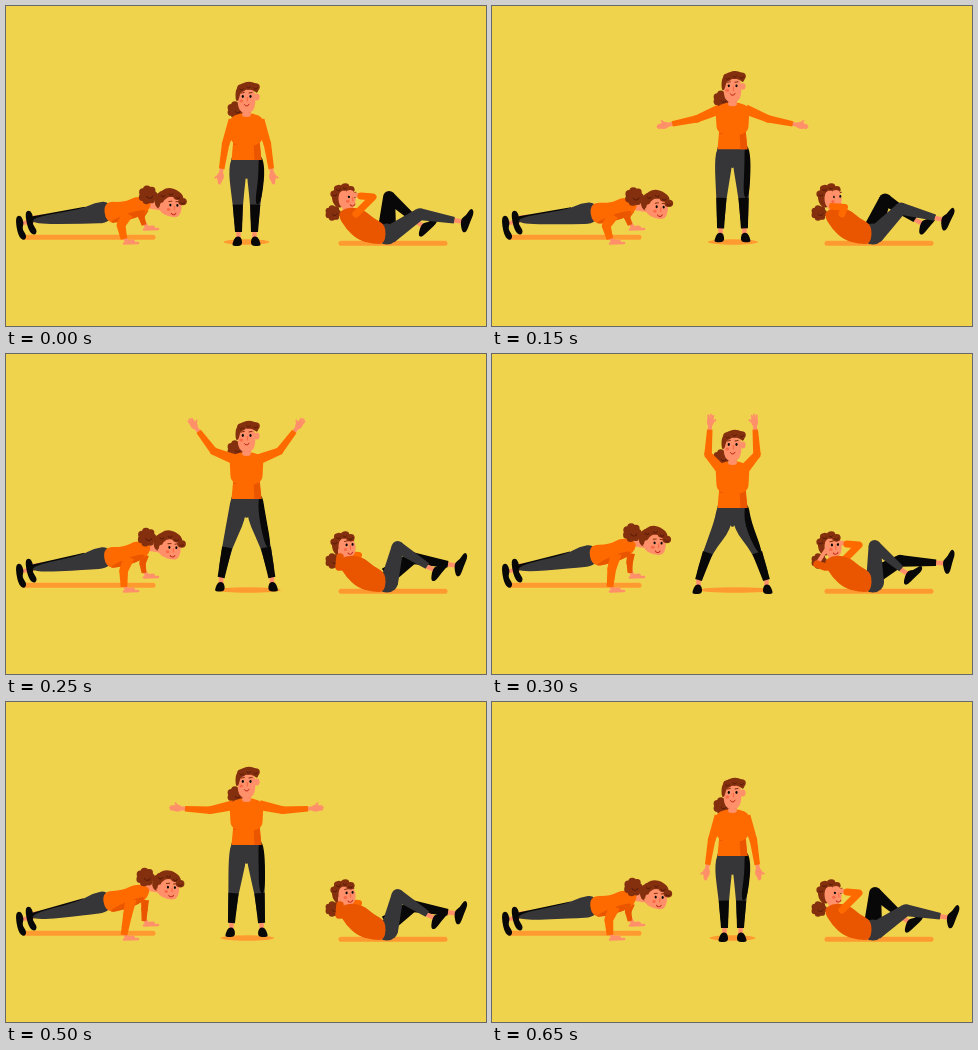
An HTML page with a canvas that plays this animation: 480 px wide and 320 px high, repeating every 700 ms.

```html
<!DOCTYPE html>
<html lang="en">
<head>
<meta charset="utf-8">
<title>Workout</title>
<style>
html, body { margin: 0; width: 100%; height: 100%; overflow: hidden; background: #f0d34d; }
canvas { display: block; width: 480px; height: 320px; }
</style>
</head>
<body>
<canvas id="stage" width="480" height="320"></canvas>
<script>
const ctx = document.getElementById('stage').getContext('2d');
const LOOP = 700, STEP = 50, AXIS = 240.5;
const BG = '#f0d34d', MAT = '#ff9a30', TOP = '#ff6a00', SHADE = '#ea5500';
const SKIN = '#ff9069', BLUSH = '#fb6a48', HAIR = '#84300f', CURL = '#5c1c08';
const PANTS = '#363638', BLACK = '#080808';

const mix = (a, b, k) => a + (b - a) * k;
const clamp = v => Math.min(1, Math.max(0, v));
const wave = (time, peak) => Math.cos((time - peak) / LOOP * Math.PI * 2);

// How far the jumping arms are raised, 0 to 1.
const RAISE = [[0, 0], [200, .53], [300, 1], [400, .87], [550, .29], [650, 0], [LOOP, 0]];

function raiseAt(time) {
  const i = RAISE.findIndex(([t]) => t > time);
  const [t0, v0] = RAISE[i - 1], [t1, v1] = RAISE[i];
  return mix(v0, v1, (time - t0) / (t1 - t0));
}

function shape(color, p) {
  ctx.beginPath();
  for (let i = 0; i < p.length; i += 2) ctx.lineTo(p[i], p[i + 1]);
  ctx.fillStyle = color;
  ctx.fill();
}

function blob(color, p) {
  const n = p.length;
  ctx.beginPath();
  for (let i = 0; i <= n; i += 2) {
    const a = i % n, b = (i + 2) % n;
    const x = (p[a] + p[b]) / 2, y = (p[a + 1] + p[b + 1]) / 2;
    if (i) ctx.quadraticCurveTo(p[a], p[a + 1], x, y);
    else ctx.moveTo(x, y);
  }
  ctx.fillStyle = color;
  ctx.fill();
}

function line(color, width, ...p) {
  ctx.beginPath();
  for (let i = 0; i < p.length; i += 2) ctx.lineTo(p[i], p[i + 1]);
  ctx.lineWidth = width;
  ctx.lineCap = ctx.lineJoin = 'round';
  ctx.strokeStyle = color;
  ctx.stroke();
}

function oval(color, x, y, rx, ry = rx) {
  ctx.beginPath();
  ctx.ellipse(x, y, rx, ry, 0, 0, 7);
  ctx.fillStyle = color;
  ctx.fill();
}

function arc(color, x, y, r) {
  ctx.beginPath();
  ctx.arc(x, y, r, .3, 2.7);
  ctx.lineWidth = 1;
  ctx.strokeStyle = color;
  ctx.stroke();
}

function taper(color, x1, y1, w1, x2, y2, w2) {
  const a = Math.atan2(y2 - y1, x2 - x1) + Math.PI / 2;
  const nx = Math.cos(a) / 2, ny = Math.sin(a) / 2;
  shape(color, [x1 + nx * w1, y1 + ny * w1, x2 + nx * w2, y2 + ny * w2,
    x2 - nx * w2, y2 - ny * w2, x1 - nx * w1, y1 - ny * w1]);
}

// Two tapered segments with a round joint.
function limb(color, x1, y1, w1, x2, y2, w2, x3, y3, w3) {
  taper(color, x1, y1, w1, x2, y2, w2);
  oval(color, x2, y2, w2 / 2);
  taper(color, x2, y2, w2, x3, y3, w3);
}

function placed(x, y, turn, draw, flip = 1) {
  ctx.save();
  ctx.translate(x, y);
  ctx.scale(flip, 1);
  ctx.rotate(turn);
  draw();
  ctx.restore();
}

function bun(x, y, r) {
  for (let i = 0; i < 7; i++) {
    const a = i * Math.PI * 2 / 7;
    oval(HAIR, x + Math.cos(a) * r * .62, y + Math.sin(a) * r * .62, r * .43);
  }
  oval(HAIR, x, y, r * .7);
  arc(CURL, x + r * .2, y, r * .35);
}

function curls(...centers) {
  for (let i = 0; i < centers.length; i += 2) {
    oval(HAIR, centers[i], centers[i + 1], 4.3, 3.7);
    arc(CURL, centers[i], centers[i + 1], 2);
  }
}

function face(x, y, gap) {
  for (const eye of [x, x + gap]) {
    oval(BLACK, eye, y, 1.1, 1.4);
    line(HAIR, 1, eye - 1.7, y - 3.5, eye + 1.5, y - 4);
  }
  oval(BLUSH, x - 1.5, y + 4.5, 1.8, 1.5);
  line(BLUSH, 1.2, x + gap * .6, y + 1, x + gap * .6, y + 4.5);
  arc('#c02a1c', x + gap / 2, y + 7, 2.5);
}

function jackLeg(side, lift, spread, ankleY) {
  const hip = 158 + lift, kneeX = mix(8.5, spread, .62), kneeY = mix(hip, ankleY, .58);
  placed(AXIS, 0, 0, () => {
    line(SKIN, 4.5, spread, ankleY - 4, spread, ankleY + 5);
    blob(PANTS, [-1, hip - 8, 15, hip - 8, 18, hip + 9, kneeX + 5.5, kneeY, spread + 3.5, ankleY - 3,
      spread - 3.5, ankleY - 3, kneeX - 4.5, kneeY, 1, hip + 17]);
    shape(PANTS, [-1, hip - 6, 15, hip - 6, 16.5, hip + 6, -1, hip + 15]);
    if (side > 0) {
      blob(BLACK, [12, hip - 7, 16, hip - 7, 18.5, hip + 9, kneeX + 6, kneeY, kneeX, kneeY, 12, hip + 13]);
    }
    taper(BLACK, kneeX + .5, kneeY, 10, spread, ankleY - 2, 7);
    blob(BLACK, [spread - 3, ankleY + 3, spread + 3, ankleY + 2, spread + 6, ankleY + 9,
      spread + 6, ankleY + 12, spread - 4, ankleY + 12]);
  }, side);
}

function jackArm(side, lift, raise) {
  const upper = (16 + 126 * raise) * Math.PI / 180, fore = (9 + 175 * raise) * Math.PI / 180;
  const reach = 25 - 8 * raise * raise, y = 114 + lift;
  const ex = 14 + Math.sin(upper) * reach, ey = y + Math.cos(upper) * reach;
  const wx = ex + Math.sin(fore) * 25, wy = ey + Math.cos(fore) * 25;
  placed(AXIS, 0, 0, () => {
    placed(wx, wy, Math.PI / 2 - fore, () => {
      line(SKIN, 4, -2, 0, 7, 0);
      oval(SKIN, 8, 0, 4.5, 3.4);
      const fan = mix(.8, 2.5, raise);
      for (const i of [-1, 0, 1]) line(SKIN, 2.1, 8, i * 1.5, 15 - Math.abs(i), i * fan);
      line(SKIN, 1.8, 6, -1, 10, -5);
    });
    limb(TOP, 13, y, 10, ex, ey, 7.5, wx, wy, 5.5);
  }, side);
}

function jackHead() {
  bun(-10.5, 12, 8.5);
  shape(SKIN, [-4, 10, 4, 10, 4, 21, -4, 21]);
  shape(BLUSH, [-4, 13, 4, 13, 4, 16, -2, 16]);
  oval(SKIN, 10.5, -1, 2.6, 3.4);
  blob(SKIN, [-9, -10, 9, -10, 9, 8, 5, 15, -5, 15, -9, 8]);
  blob(HAIR, [-11, 3, -11, -9, -5, -15, 5, -17, 13, -12, 11, -4, 7, -8, 0, -9, -6, -6, -8, 3]);
  curls(-5, -10, 2, -12, 9, -11);
  face(-3.7, -1.5, 7.7);
}

function drawJack(time) {
  const raise = raiseAt(time), open = clamp((raise - .29) / .71);
  const lift = -11 * Math.sqrt(Math.sin(Math.PI * raise));
  const spread = 8 + 26 * open, ankleY = 228 - 34 * open * (1 - open) ** 2;
  oval(MAT, AXIS + 3 * open, 236, 23 + 14 * open, 2.8);
  for (const side of [1, -1]) jackLeg(side, lift, spread, ankleY);
  placed(AXIS, 92 + lift, 0, jackHead);
  for (const side of [1, -1]) jackArm(side, lift, raise);
  placed(AXIS, lift, 0, () => {
    shape(TOP, [-13, 132, 13, 132, 15, 154, -15, 154]);
    shape(SHADE, [7, 137, 13, 137, 15, 154, 8, 154]);
    line(SHADE, 1.4, -12.5, 138, 12.5, 138);
    blob(TOP, [-7, 107, 7, 107, 17, 112, 16.5, 122, 15.5, 140, -15.5, 140, -16.5, 122, -17, 112]);
    oval(SKIN, 0, 108.5, 4.5, 2.5);
  });
}

function pushHead() {
  bun(-19, -8, 9);
  oval(HAIR, -7, -3, 5, 8);
  blob(SKIN, [-9, -5, 2, -11, 14, -6, 16, 4, 13, 13, 3, 13, -7, 8]);
  blob(HAIR, [-10, 2, -9, -10, 0, -17, 12, -14, 18, -6, 12, -5, 4, -8, -2, -5, -6, 4]);
  curls(-4, -9, 4, -11, 11, -8, 16, -3);
  oval(SKIN, -4, 2, 2.4, 3.2);
  face(4, 1, 7);
}

function pushArm(x, y, handX, handY, bend, width, color) {
  line(SKIN, 4, handX, handY - 3, handX + 3, handY + 3, handX + 9, handY + 2.5);
  line(SKIN, 2.6, handX, handY + 4.5, handX + 14, handY + 4);
  limb(color, x, y, width, mix(x, handX, .5) - bend, mix(y, handY, .45), width * .8, handX, handY, width * .6);
}

function pushShoe() {
  line(SKIN, 4, 2, -4, 12, -5);
  blob(BLACK, [-5, -10, 1, -12, 4, -4, 2, 2, 7, 9, 4, 14, -2, 9]);
}

function drawPushUp(time) {
  const rise = Math.min(1, .6 - .6 * wave(time, 90));
  line(MAT, 5, 18, 231.3, 147, 231.3);
  pushArm(139, mix(204, 198, rise), 138, 219, 4 * (1 - rise), 8, SHADE);
  placed(14, 221, 0, pushShoe);
  placed(24, 216, -.05, pushShoe);

  const slope = mix(-.085, -.2, rise);
  placed(30, 214, slope, () => {
    shape(BLACK, [-3, -4, 50, -8, 50, 0, -3, 2]);
    blob(PANTS, [-3, -3, 46, -6, 60, -11, 76, -11, 76, 11, 48, 9, -3, 4]);
  });

  const headX = mix(161, 158, rise), headY = mix(201, 184, rise);
  const hipX = 30 + Math.cos(slope) * 71, hipY = 214 + Math.sin(slope) * 71;
  line(SKIN, 8, hipX + 38, headY, headX - 3, headY + 3);
  placed(hipX, hipY, -.07 * rise, () => {
    blob(TOP, [-3, -11, 18, -10, 30, -16, 43, -13, 45, -7, 39, 2, 19, 9, -1, 11]);
    blob(SHADE, [9, 6, 24, 0, 40, -3, 37, 3, 19, 9, 2, 11]);
  });
  placed(headX, headY, .05, pushHead);
  pushArm(mix(121, 125, rise), mix(210, 197, rise), 118, 233, 6 * (1 - rise), 11, TOP);
}

function crunchLeg(color, hipX, hipY, thigh, shin, ankleX, ankleY) {
  const dx = ankleX - hipX, dy = ankleY - hipY;
  const reach = Math.min(Math.hypot(dx, dy), thigh + shin - .1);
  const lean = Math.acos((thigh ** 2 + reach ** 2 - shin ** 2) / (2 * thigh * reach));
  const a = Math.atan2(dy, dx) - lean;
  const kneeX = hipX + Math.cos(a) * thigh, kneeY = hipY + Math.sin(a) * thigh;
  const endX = mix(kneeX, ankleX, .88), endY = mix(kneeY, ankleY, .88);
  const turn = Math.atan2(ankleY - kneeY, ankleX - kneeX);
  placed(ankleX, ankleY, turn * .8, () => {
    line(SKIN, 4.5, -6, 0, 4, 0);
    blob(BLACK, [2, 3, 5, 11, 9, 10, 11, 0, 14, -11, 10, -15, 6, -6, 2, -3]);
  });
  limb(color, hipX, hipY, 18, kneeX, kneeY, 12, endX, endY, 6.5);
}

function crunchHead(twist) {
  oval(HAIR, -7, -1, 7, 10);
  blob(SKIN, [-7, -7, 4, -10, 9, -4, 10, 3, 7, 11, -2, 12, -8, 6]);
  curls(-11, -5, -7, -10, 0, -11, 5, -8);
  oval(SKIN, -4, 2, 2.3, 3);
  face(mix(3, 0, twist), -1, 6);
}

function drawCrunch(time) {
  const twist = clamp(.5 + .64 * wave(time, 375)), middle = 4 * twist * (1 - twist);
  const reach = 1 - middle, front = twist < .5;
  line(MAT, 5, 335, 237.3, 439, 237.3);
  crunchLeg(BLACK, 381, 222, 31, 41, mix(414, 449, twist) + 8 * middle, mix(218, 209, twist));

  const elbowX = mix(346, 367, reach), elbowY = mix(206, 191, reach);
  const raisedArm = () => {
    line(SKIN, 4.5, elbowX - 8, elbowY, 345, 188);
    oval(SKIN, 344, 187, 4, 3);
    line(TOP, 7, 350, 208, elbowX, elbowY, elbowX - 12, elbowY - 1);
  };
  bun(327, 207, 7.5);
  line(SKIN, 9, 339, 196, 343, 208);
  if (!front) raisedArm();
  placed(340, 192, -.08, () => crunchHead(twist));

  crunchLeg(PANTS, 383, 229, 37, 40, mix(453, 413, twist) + 5 * middle, mix(215, 218, twist) - 4 * middle);
  oval(PANTS, 381, 228, 11, 10.5);
  blob(SHADE, [331, 208, 341, 201, 357, 203, 367, 212, 380, 219, 379, 238, 367, 238, 352, 234, 340, 223]);
  if (front) {
    raisedArm();
  } else {
    const dropX = mix(325, 338, middle), dropY = mix(210, 200, middle);
    line(SKIN, 4, dropX, dropY, 334, 196);
    line(SHADE, 7.5, 346, 212, 333, 213, dropX, dropY);
  }
}

function play() {
  const time = Math.floor((performance.now() - start) % LOOP / STEP) * STEP;
  ctx.fillStyle = BG;
  ctx.fillRect(0, 0, 480, 320);
  drawPushUp(time);
  drawJack(time);
  drawCrunch(time);
  requestAnimationFrame(play);
}

const start = performance.now();
play();
</script>
</body>
</html>
```
